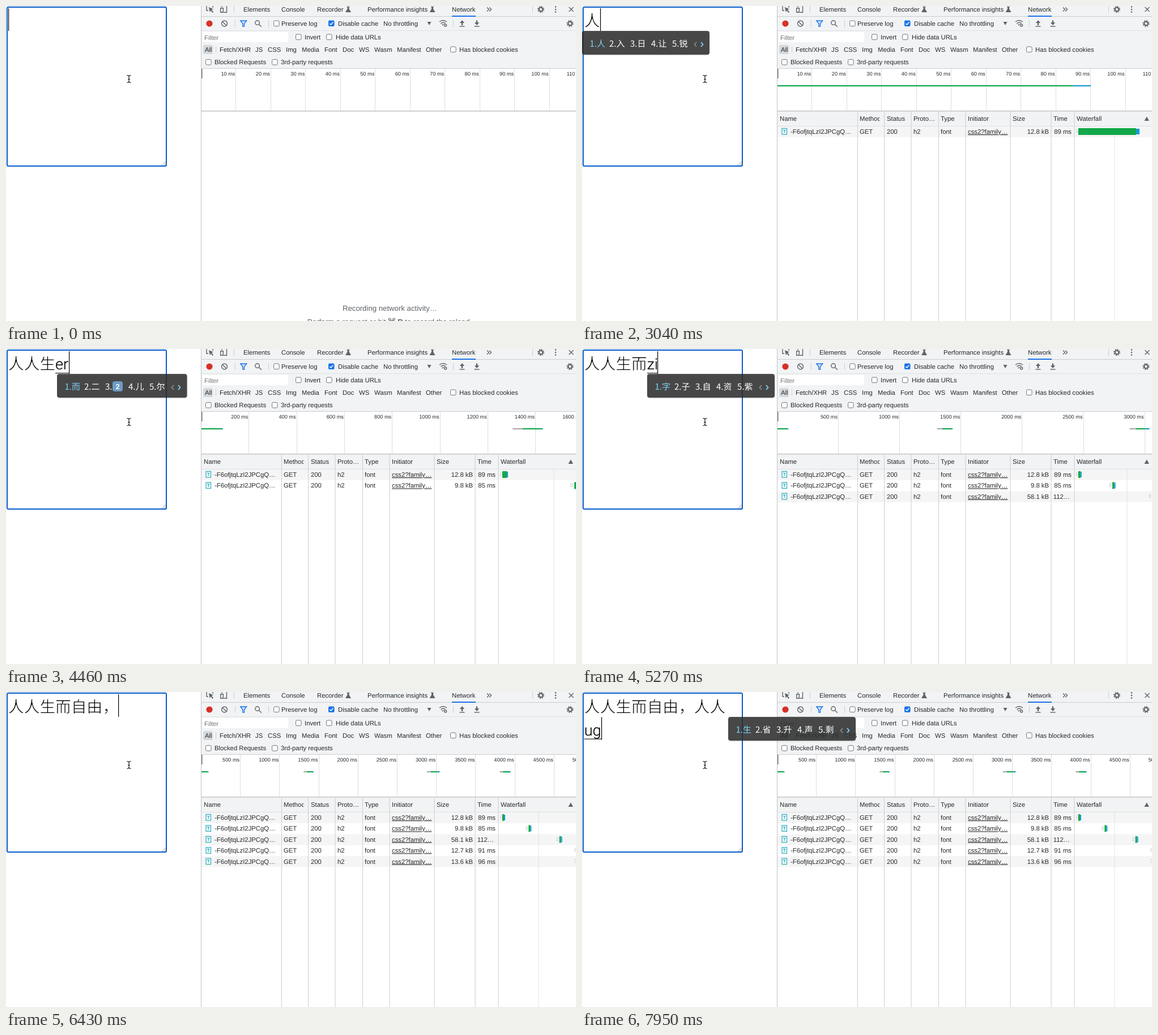
Write an HTML page that moves like this. It is 1006 by 557 pixels and loops after 8000 ms.

```html
<!DOCTYPE html>
<html lang="zh-CN">
<head>
<meta charset="utf-8">
<title>Font loading while typing</title>
<style>
html, body { margin: 0; width: 100%; height: 100%; overflow: hidden; background: #fff; }
svg { display: block; }
text { font: 11.3px "Liberation Sans", Arial, sans-serif; fill: #26292c; text-rendering: geometricPrecision; white-space: pre; }
.tick { font-size: 9.2px; }
.hint { font-size: 13.2px; fill: #5f6368; }
.dim { fill: #777; }
.link { text-decoration: underline; }
.end { text-anchor: end; }
.mid { text-anchor: middle; }
.page { font: 300 27.7px "Noto Sans CJK SC", "Noto Sans CJK", sans-serif; fill: #000; stroke: #fff; stroke-width: .75; }
.latin { font: 300 27px Roboto, "Open Sans", sans-serif; fill: #000; stroke: #000; stroke-width: .2; }
.fallback { font: 28px "Liberation Sans", Arial, sans-serif; }
.pick { font: 15px "Noto Sans CJK SC", "Noto Sans CJK", sans-serif; fill: #fff; }
.first { fill: #7fd3f7; }
.key { font: bold 13px "Liberation Sans", sans-serif; fill: #fff; }
.icon { fill: none; stroke: #5f6368; stroke-width: 1.4; }
</style>
</head>
<body>
<svg id="stage" width="1006" height="557" viewBox="0 0 1006 557"></svg>
<script>
const text = (x, y, s, cls = '') => `<text x="${x}" y="${y}" class="${cls}">${s}</text>`;
const rect = (x, y, w, h, fill, more = '') =>
  `<rect x="${x}" y="${y}" width="${w}" height="${h}" fill="${fill}" ${more}/>`;
const path = (d, more = 'class="icon"') => `<path d="${d}" ${more}/>`;
const fillPath = (d, fill = '#5f6368') => path(d, `fill="${fill}"`);
const ring = (x, y, r, more = '') => `<circle cx="${x}" cy="${y}" r="${r}" class="icon" ${more}/>`;
const line = (x, y, h, fill = '#cacdd1') => rect(x, y, 1, h, fill);

const GREEN = '#12a84a', BLUE = '#1a9bd7', GRAY = '#a9a9a9', PANEL = '#f1f3f4';

const gear = (x, y) => ring(x, y, 3.3, 'style="stroke-width:2.2"') +
  ring(x, y, 5.2, 'style="stroke-width:1.7" stroke-dasharray="2.04"');
const flask = x => fillPath(`M${x + 2} 1h5v1h-1v3l3.5 6h-10l3.5 -6v-3h-1z`);
const box = (x, y, checked) => checked
  ? rect(x, y, 10.5, 10.5, '#1a73e8', 'rx="2"') +
    path(`M${x + 2.3} ${y + 5.4}l2.2 2.3l3.8 -4.8`, 'fill="none" stroke="#fff" stroke-width="1.5"')
  : rect(x + .5, y + .5, 9.6, 9.6, '#fff', 'rx="2" stroke="#767676"');
const arrow = (x, up) => rect(x - 1.2, up ? 29 : 25.5, 2.4, 5, '#5f6368') + rect(x - 4.5, 35.3, 9, 1.4, '#5f6368') +
  fillPath(up ? `M${x - 4.2} 30h8.4l-4.2 -4.8z` : `M${x - 4.2} 29.3h8.4l-4.2 4.8z`);

function toolbar() {
  const labels = [
    [9.8, [419, 'Elements'], [486, 'Console'], [549, 'Recorder'], [638, 'Performance insights'], [787, 'Network']],
    [34.8, [486, 'Preserve log'], [586, 'Disable cache'], [666, 'No throttling']],
    [58.8, [527, 'Invert'], [582, 'Hide data URLs']],
    [81, [351, 'All'], [377, 'Fetch/XHR'], [440, 'JS'], [462, 'CSS'], [494, 'Img'], [522, 'Media'], [562, 'Font'],
      [594, 'Doc'], [623, 'WS'], [650, 'Wasm'], [690, 'Manifest'], [741, 'Other'], [800, 'Has blocked cookies']],
    [103, [368, 'Blocked Requests'], [485, '3rd-party requests']]
  ];
  return rect(344, 0, 662, 110, PANEL) + rect(345, 18, 661, 1, '#cacdd1') + rect(345, 43, 661, 1, '#dfe1e4') +
    rect(345, 110, 661, 1, '#cacdd1') + rect(787, 17, 42, 2, '#1a73e8') +
    rect(347, 46, 151, 18, '#fff') + rect(348, 69, 17, 16, '#d6d9dc', 'rx="3"') +
    labels.map(([y, ...row]) => row.map(([x, s]) => text(x, y, s)).join('')).join('') +
    text(350, 59.5, 'Filter', 'dim') +
    [[402, 0], [929, 0], [404, 25], [463, 25], [789, 25], [370, 71]].map(([x, y]) => line(x, y, 12)).join('') +
    // tab strip icons
    path('M354 -1v9h3M365 -1v4') + fillPath('M358 2l8 3.5l-3.2 1.2l3.2 3.8l-1.6 1.4l-3 -3.8l-1.6 2.8z') +
    path('M381 -1v3M389.5 -1v12.3h-5M378.7 3.7h4.6v7.6h-4.6z') +
    flask(599.5) + flask(748) +
    path('M849 2.5l3.3 3.5l-3.3 3.5M853.2 2.5l3.3 3.5l-3.3 3.5') + gear(944, 6) +
    [1.5, 6, 10.5].map(y => `<circle cx="970" cy="${y}" r="1.3" fill="#5f6368"/>`).join('') +
    path('M993.5 2l8 8m0 -8l-8 8') +
    // network toolbar icons
    '<circle cx="359" cy="31" r="5.6" fill="#d93025"/>' + ring(385.5, 31, 5) + path('M382 27.5l7 7') +
    path('M413.8 26h10.8l-4.1 5.3v4.8h-2.6v-4.8z', 'fill="#d2e3fc" stroke="#1a73e8" stroke-width="1.4"') +
    ring(443.6, 29.6, 3.8) + path('M446.5 32.5l4.3 4.3') +
    fillPath('M743.5 28h7l-3.5 6z') +
    path('M765 28q6.5 -5 13 0M767.3 31q4.2 -3 8 -.6M769.5 33.7q1.8 -1.2 3 -.3') + ring(775.6, 34, 2) +
    arrow(805, true) + arrow(831, false) + gear(995.5, 31) +
    box(472, 25.5) + box(569, 25.5, true) + box(511, 49.5) + box(565, 49.5) +
    box(784, 71.5) + box(352, 94) + box(469, 94);
}

const textarea = rect(2, 2, 281, 281, '#fff', 'rx="2" stroke="#075dc8" stroke-width="2"') +
  path('M275.5 282l6.5 -6.5M279.5 282l2.5 -2.5', 'stroke="#777" stroke-width=".9"');
const pointer = path('M213.5 122.5q3.5 0 3.5 2.5q0 -2.5 3.5 -2.5M217 124.5v9M213.5 135.5q3.5 0 3.5 -2.5q0 2.5 3.5 2.5M215.3 129.5h3.4',
  'fill="none" stroke="#000" stroke-width="1.1"');

// step of the time ruler in ms and px, waterfall px per ms, waterfall grid line
const scales = [[10, 61.45, 1.2, 940], [200, 84.3, .0944, 967], [500, 108.1, .0446, 962], [500, 69.2, .0344, 940]];
// size, duration, then queued / sent / received / finished in ms
const requests = [
  ['12.8 kB', '89 ms', 0, 0, 85, 90],
  ['9.8 kB', '85 ms', 1303, 1345, 1425, 1430],
  ['58.1 kB', '112…', 2875, 2925, 3005, 3037],
  ['12.7 kB', '91 ms', 3806, 3846, 3930, 3935],
  ['13.6 kB', '96 ms', 3806, 3846, 3935, 3942]
];

function overview({ scale, rows, done }) {
  const [ms, px] = scales[scale], at = time => 345 + time * px / ms;
  let out = rect(344, 111, 662, 75, '#fff');
  for (let i = 1; i <= 11; i++) {
    const x = 345 + i * px;
    out += line(Math.floor(x - .5), 111, 75, '#dedede') + text(x - 2, 123, i * ms + ' ms', 'tick end');
  }
  requests.slice(0, rows).forEach(([, , queued, sent, received, finished], i) => {
    const bar = (a, b, fill) => rect(at(a), 140, at(b) - at(a), 2.2, fill);
    out += bar(queued, sent, GRAY);
    if (i < done) out += bar(sent, received, GREEN) + bar(received, finished, BLUE);
  });
  return out + rect(345, 111, 1.5, 17, '#777') + rect(345, 185, 661, 1.5, '#c0c2c5');
}

function table({ scale, rows, done }) {
  if (!rows) return text(677.5, 538.5, 'Recording network activity…', 'hint mid') +
    text(677, 562.5, 'Perform a request or hit <tspan font-weight="bold">⌘ R</tspan> to record the reload.', 'hint mid');
  const [, , k, gridX] = scales[scale];
  let out = rect(345, 187, 661, 25, PANEL) + rect(345, 212, 661, 1, '#cacdd1');
  for (let i = 0; i < rows; i += 2) out += rect(345, 212.5 + 19.4 * i, 661, 19.4, '#f5f5f5');
  out += line(gridX - .5, 213, 344, '#e4e4e4') +
    [486, 533, 580.5, 629, 676.5, 755.5, 827.5, 868.5].map(x => line(x, 187, 370)).join('');
  [[349, 'Name'], [490, 'Method'], [538, 'Status'], [585, 'Proto…'], [633, 'Type'], [681, 'Initiator'],
    [760, 'Size'], [832, 'Time'], [873, 'Waterfall']].forEach(([x, s]) => out += text(x, 203.2, s));
  out += rect(525.5, 190, 6, 20, PANEL) + fillPath('M992.5 203l4.2 -7.5l4.2 7.5z');

  requests.slice(0, rows).forEach(([size, duration, queued, sent, received, finished], i) => {
    const y = 226 + 19.4 * i, ready = i < done, time = ready ? duration : 'Pen…';
    out += rect(353, y - 9.5, 8.5, 10.5, '#fff', 'stroke="#22a9bf" stroke-width="1.2"') +
      path(`M355 ${y - 6.5}h4.5M357.2 ${y - 6.5}v5`, 'stroke="#22a9bf" stroke-width="1.2"') +
      text(368, y, '-F6ofjtqLzI2JPCgQ…') + text(490, y, 'GET') +
      text(538, y, ready ? '200' : '(pen…', ready ? '' : 'dim') + (ready ? text(585, y, 'h2') : '') +
      text(633, y, 'font') + text(681, y, 'css2?family…', 'link') +
      text(824, y, ready ? size : '0 B', 'end') +
      (time.endsWith('…') ? text(831.7, y, time, ready ? '' : 'dim') : text(864, y, time, 'end'));
    if (ready || queued)
      out += rect(873 + k * queued, y - 7, Math.max(2.4, k * (sent - queued)), 5, '#fff', 'stroke="#c4c4c4" stroke-width=".8"');
    if (ready) {
      const x = 876 + k * sent, w = Math.max(3, k * (received - sent));
      out += rect(x, y - 10, w, 12, GREEN) + rect(x + w, y - 9, Math.max(2, k * (finished - received)), 10, BLUE);
    }
  });
  return out;
}

function popup([x, words]) {
  const emoji = words[2] === '2';
  let out = rect(x + .5, 46, 225 + 4.5 * emoji, 41.5, '#000', 'rx="5" opacity=".15"') +
    rect(x, 44, 225 + 4.5 * emoji, 42, '#2e2e2e', 'rx="4" opacity=".85"');
  [...words].forEach((word, i) => {
    const left = x + (i ? 11 + 37 * i : 13.5) + (emoji && i > 2 ? 4 : 0);
    const key = emoji && i === 2;
    out += text(left, 71.7, `${i + 1}.${key ? '' : word}`, i ? 'pick' : 'pick first');
    if (key) out += rect(left + 13, 57, 18, 18, '#6d9cc4', 'rx="4"') + text(left + 22, 70.7, word, 'key mid');
  });
  const tip = x + 198 + 4 * emoji;
  const chevron = (d, color) => path(d, `fill="none" stroke="${color}" stroke-width="1.8"`);
  return out + chevron(`M${tip + 4} 64l-3.5 4l3.5 4`, '#8a8a8a') + chevron(`M${tip + 12} 64l3.5 4l-3.5 4`, '#7fd3f7');
}

function editor({ typed, input, caret, blink, pick, fallback, line2 }) {
  const end = 4 + 27.7 * typed.length, drop = line2 ? 40.5 : 0, left = line2 ? 4 : end;
  const x = input ? caret : end;
  let out = text(4, 36, typed, 'page');
  if (input) {
    const [head, ...tail] = input;
    out += text(left, 36 + drop, `<tspan class="${fallback ? 'fallback' : ''}">${head}</tspan>${tail.join('')}`, 'latin');
    if (input !== 'r') out += rect(left, 42 + drop, x - left, 1.2, '#222');
  }
  if (blink) out += rect(Math.round(x), 4 + drop, 1.2, 40, '#000');
  return out + (pick ? popup(pick) : '');
}

const REN = '人入日让锐', SHENG = '生省升声剩';
const write = (typed, pick = null) => ({ typed, pick, input: '', blink: true, line2: false });
const compose = (input, caret, pick = null) => ({ input, caret, pick, blink: true });
const on = { blink: true }, off = { blink: false };
const events = [
  [0, { ...write(''), scale: 0, rows: 0, done: 0 }],
  [450, off], [890, on], [1430, off],
  [1880, { ...compose('r', 13), fallback: true, rows: 1 }],
  [1970, { ...compose('rf', 19), done: 1 }],
  [2500, off],
  [2680, { fallback: false }],
  [3040, write('人', [0, REN])],
  [3130, { pick: null, rows: 2, scale: 1 }],
  [3300, { done: 2 }],
  [3480, write('人人', [20, REN])],
  [3570, { pick: null }],
  [3930, compose('ug', 89, [64, SHENG])],
  [4110, write('人人生')],
  [4380, compose('e', 102)],
  [4460, compose('er', 111, [90, '而二2儿尔'])],
  [4730, write('人人生而')],
  [4820, { rows: 3, scale: 2 }],
  [5000, { done: 3 }],
  [5270, compose('zi', 133, [115, '字子自资紫'])],
  [5540, write('人人生而自')],
  [5630, { rows: 5, scale: 3 }],
  [5710, compose('yz', 169, [145, '由有又右游'])],
  [5800, { done: 5 }],
  [5890, write('人人生而自由')],
  [6160, off],
  [6430, write('人人生而自由，')],
  [6960, off],
  [7230, write('人人生而自由，人', [187, REN])],
  [7320, { pick: null }],
  [7500, write('人人生而自由，人人', [215, REN])],
  [7590, { pick: null }],
  [7860, compose('u', 269)],
  [7950, { ...compose('ug', 34, [258, SHENG]), line2: true }]
];

const stage = document.getElementById('stage');
const fixed = textarea + toolbar();
let shown = 0;

function frame() {
  const t = performance.now() % 8000;
  const past = events.filter(([time]) => time <= t);
  if (past.length !== shown) {
    shown = past.length;
    const state = Object.assign({}, ...past.map(([, change]) => change));
    stage.innerHTML = fixed + overview(state) + table(state) + line(344, 0, 557, '#bfc3c8') + pointer + editor(state);
  }
  requestAnimationFrame(frame);
}
frame();
</script>
</body>
</html>
```
